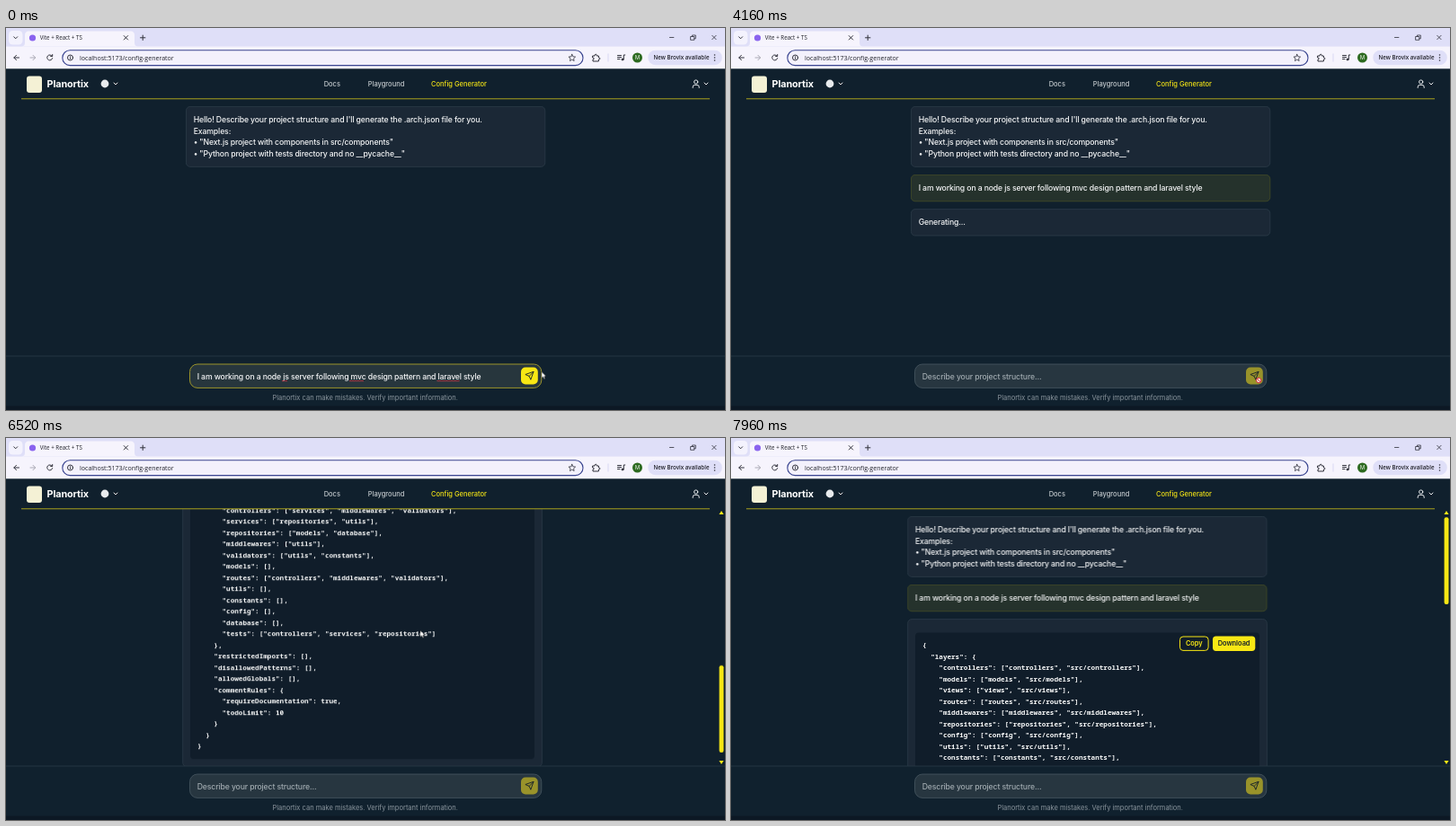
These frames come from a looping animation (800 px wide and 425 px high, 8 s). An HTML page:

```html
<!DOCTYPE html>
<html lang="en">
<head>
<meta charset="utf-8">
<title>Config Generator</title>
<style>
  html, body { margin: 0; width: 100%; height: 100%; overflow: hidden; background: #10202d; }
  svg { display: block; width: 100vw; height: 100vh; }
  text { font: 8.7px Inter, sans-serif; fill: #f6f7f8; white-space: pre; }
  .browser text { font: 6.2px "Open Sans", sans-serif; fill: #22232b; }
  .browser .url { font-size: 7.05px; }
  .browser .update { font-size: 6.2px; font-weight: 600; }
  .nav .brand { font-size: 10.8px; font-weight: 700; letter-spacing: -.1px; fill: #fff; text-anchor: start; }
  .nav text { font-size: 7.5px; font-weight: 500; fill: #c3c9cd; text-anchor: middle; }
  .nav .active { fill: #f3e316; }
  .chat text, .composer text { font-weight: 500; letter-spacing: -.14px; }
  .chat .code text { font: 600 7.64px "Noto Sans Mono", monospace; letter-spacing: 0; fill: #fafbfb; }
  .chat .label { font-size: 7.4px; font-weight: 600; letter-spacing: 0; text-anchor: middle; }
  .composer .note { font-size: 7.5px; font-weight: 400; letter-spacing: 0; fill: #8b969e; text-anchor: middle; }
  .composer .hint { fill: #a0aaaf; }
  .line { fill: none; stroke-linecap: round; stroke-linejoin: round; }
  .card { fill: #1b2836; stroke: #303f4c; stroke-width: .7; }

  .draft, .sent, .pending, .answer, .shift, .arrow, .pointer, .blocked {
    animation: 8s step-end infinite;
  }
  .draft { animation-name: draft; }
  .sent { animation-name: sent; }
  .pending { animation-name: pending; }
  .answer { animation-name: answer; }
  .shift { animation-name: shift; }
  .blocked { animation-name: blocked; }
  .arrow { animation-name: arrow; }
  .pointer { animation-name: pointer; animation-timing-function: ease-in-out; }
  .scroll { animation: scroll 8s linear infinite; }

  @keyframes draft { 0% { opacity: 1 } 5.5%, 100% { opacity: 0 } }
  @keyframes sent { 0% { opacity: 0 } 5.5%, 100% { opacity: 1 } }
  @keyframes pending { 0% { opacity: 0 } 5.5% { opacity: 1 } 58%, 100% { opacity: 0 } }
  @keyframes answer { 0% { opacity: 0 } 58%, 100% { opacity: 1 } }
  @keyframes shift { 0% { transform: none } 58%, 100% { transform: translateX(-3.7px) } }
  @keyframes blocked { 0% { opacity: 0 } 5.5% { opacity: 1 } 71%, 100% { opacity: 0 } }
  @keyframes arrow { 0% { opacity: 1 } 5.5% { opacity: 0 } 71% { opacity: 1 } 95.5%, 100% { opacity: 0 } }
  @keyframes pointer {
    0%, 1.5% { transform: translate(596px, 382.5px) }
    5%, 71% { transform: translate(583px, 387px) }
    78%, 100% { transform: translate(461px, 214.3px) }
  }
  @keyframes scroll {
    0% { transform: none }
    58.23% { transform: none; animation-timing-function: ease-in-out }
    67%, 81% { transform: translateY(var(--travel)) }
    95.25%, 100% { transform: none }
  }
</style>
</head>
<body>
<svg viewBox="0 0 800 425" preserveAspectRatio="none">
  <defs>
    <clipPath id="view"><rect y="79" width="800" height="286"/></clipPath>
    <path id="chevron" class="line" d="M-2-1 0 1 2-1" stroke-width="1"/>
    <path id="send" class="line" transform="translate(577.4 381.8) scale(.43)" stroke="#16212b"
      stroke-width="2.1" d="M22 2 11 13M22 2l-7 20-4-9-9-4z"/>
  </defs>

  <rect width="800" height="425" fill="#10202d"/>

  <g class="chat" clip-path="url(#view)">
    <g class="scroll" style="--travel:-506px">
      <g class="shift">
        <rect class="card" x="200.4" y="87.4" width="399.4" height="67" rx="4.5"/>
        <text x="208.7" y="105.2">Hello! Describe your project structure and I'll generate the .arch.json file for you.</text>
        <text x="208.7" y="117.7">Examples:</text>
        <text x="208.7" y="130.2">• "Next.js project with components in src/components"</text>
        <text x="208.7" y="142.7">• "Python project with tests directory and no __pycache__"</text>
        <g class="sent">
          <rect x="200.4" y="163.4" width="399.4" height="29.4" rx="4.5" fill="#25322c" stroke="#4d5328" stroke-width=".7"/>
          <text x="208.7" y="181.2">I am working on a node js server following mvc design pattern and laravel style</text>
        </g>
        <g class="pending">
          <rect class="card" x="200.4" y="201.6" width="399.4" height="29.4" rx="4.5"/>
          <text x="208.7" y="219.4">Generating...</text>
        </g>
      </g>
      <g class="answer">
        <rect class="card" x="196.7" y="201.6" width="399.6" height="652" rx="4.5"/>
        <rect x="205" y="216.5" width="383" height="628.5" rx="4" fill="#101d2a"/>
        <g class="code" id="code"></g>
        <rect x="499.5" y="221" width="31.6" height="15.4" rx="3.5" fill="#101d2a" stroke="#f8e714"/>
        <text class="label" x="515.3" y="231.4" style="fill:#f8e714">Copy</text>
        <rect x="536" y="220.5" width="47.3" height="16.4" rx="3.7" fill="#f8e714"/>
        <text class="label" x="559.6" y="231.4" style="fill:#15202a">Download</text>
      </g>
    </g>
  </g>

  <g class="answer" fill="#f8e714">
    <path d="m796 81 2.6 4h-5.2zM796 363l2.6-4h-5.2z"/>
    <rect class="scroll" style="--travel:171px" x="793.6" y="88.3" width="4.9" height="96.6" rx="2"/>
  </g>

  <g class="nav">
    <rect x="17" y="78.2" width="766" height="1.1" fill="#9b9420"/>
    <rect x="23" y="53.5" width="17" height="18.5" rx="3" fill="#f4f1d5"/>
    <text class="brand" x="45.5" y="66">Planortix</text>
    <circle cx="110" cy="62" r="4.4" fill="#e8ebed"/>
    <use href="#chevron" x="122" y="62" stroke="#e8ebed"/>
    <text x="362.8" y="64.8">Docs</text>
    <text x="423" y="64.8">Playground</text>
    <text class="active" x="504" y="64.8">Config Generator</text>
    <g class="line" stroke="#e8ebed" stroke-width="1">
      <circle cx="767.7" cy="60" r="2.1"/>
      <path d="M764.2 66.5v-.8a2.3 2.3 0 0 1 2.3-2.3h2.4a2.3 2.3 0 0 1 2.3 2.3v.8"/>
      <use href="#chevron" x="779" y="62"/>
    </g>
  </g>

  <g class="composer">
    <rect y="365" width="800" height="60" fill="#10212e"/>
    <rect y="364.6" width="800" height=".8" fill="#293a47"/>
    <rect y="420.5" width="800" height="4.5" fill="#0c1824"/>
    <g class="draft">
      <rect x="204.5" y="374" width="391.3" height="26.4" rx="8.5" fill="#27363d" stroke="#9b942b"/>
      <text x="212.7" y="390.6">I am working on a node js server following mvc design pattern and laravel style</text>
      <path d="M307 392.7h6M382 392.7h16M479.5 392.7h25" stroke="#cf3645" stroke-width=".8"/>
      <rect x="573" y="377.6" width="18.8" height="18.8" rx="5" fill="#f8e714"/>
    </g>
    <g class="sent">
      <rect x="204.5" y="374" width="391.3" height="26.4" rx="8.5" fill="#273640" stroke="#4a5962" stroke-width=".8"/>
      <text class="hint" x="212.7" y="390.6">Describe your project structure...</text>
      <rect x="573" y="377.6" width="18.8" height="18.8" rx="5" fill="#99932a"/>
    </g>
    <use href="#send"/>
    <text class="note" x="399.7" y="414.3">Planortix can make mistakes. Verify important information.</text>
  </g>

  <g class="browser">
    <rect width="800" height="45.3" fill="#f6f4fd"/>
    <rect width="800" height="20.6" fill="#dfdff8"/>
    <rect x="3" y="3" width="15.5" height="15.5" rx="4.5" fill="#f3f2fd"/>
    <path d="M17 20.6q4 0 4-4V8q0-4.5 4.5-4.5h113q4.500 0 4.500 4.500v8.600q0 4 4 4z" fill="#f6f4fd"/>
    <circle cx="29.5" cy="11" r="3.6" fill="#8a63ee"/>
    <text x="37.7" y="13.1">Vite + React + TS</text>
    <rect x="62.8" y="24.8" width="579.2" height="16.8" rx="8.4" fill="#f3f1fc" stroke="#38438f" stroke-width="1.1"/>
    <text class="url" x="82" y="35.7">localhost:5173/config-generator</text>
    <g class="line" stroke="#30313b" stroke-width="1">
      <use href="#chevron" x="10.7" y="10.8"/>
      <path d="m131.2 8.6 4.4 4.4m0-4.400-4.400 4.400M149.500 10.800h5.400m-2.700-2.700v5.400"/>
      <path d="M738.5 10.500h4.400M762 9.500h3.800v3.800H762zM763.500 9.500V8h3.800v3.800h-1.500M785.700 8.300l4.400 4.400m0-4.400-4.400 4.400" stroke-width=".8"/>
      <path d="M14.5 33H9m2.500-2.700L8.800 33l2.700 2.700"/>
      <path d="M27 33h5.500m-2.500-2.700 2.700 2.700-2.700 2.700" stroke="#aaa9b5"/>
      <path d="M51.3 31.300a3 3 0 1 0 .4 2.300M51.700 29.500v2h-2"/>
      <circle cx="71.5" cy="33" r="3"/>
      <path d="M71.5 32.800v1.500m0-3v.05"/>
      <path d="m629.8 29.300 1.100 2.500 2.700.3-2 1.800.5 2.700-2.300-1.400-2.300 1.400.5-2.700-2-1.800 2.700-.3z" stroke-width=".8"/>
      <path d="M653 31h2q0-1.800 1.200-1.800t1.200 1.800h2v2q1.600 0 1.600 1t-1.600 1v2H653v-2q1.300 0 1.300-1t-1.300-1z"/>
      <path d="M680.5 30.500h4m-4 2h4m-4 2h2.500m4.300 0v-4.500h1.500"/>
      <circle cx="686" cy="35" r="1" fill="#30313b"/>
    </g>
    <rect x="669.6" y="28.5" width=".8" height="9" fill="#d2d1ef"/>
    <circle cx="702.5" cy="33" r="5.5" fill="#2d6a20"/>
    <text x="702.5" y="35.1" text-anchor="middle" style="fill:#fff">M</text>
    <rect x="714.3" y="24.7" width="82.5" height="16.5" rx="8.25" fill="#dfdff8"/>
    <text class="update" x="720.5" y="35.2">New Brovix available</text>
    <path d="M788.5 30v.01M788.500 33v.01M788.500 36v.01" class="line" stroke="#30313b" stroke-width="1.6"/>
  </g>

  <g class="blocked" stroke="#d62b3c" stroke-width="1">
    <circle cx="587.2" cy="392" r="2.7" fill="#f3e4dc"/>
    <path d="m585.3 390.1 3.8 3.8"/>
  </g>
  <g class="arrow">
    <path class="pointer" d="M0 0v7l1.700-1.500 1.100 2.500 1.100-.5L2.800 5H5z" fill="#fff" stroke="#1a1a1a" stroke-width=".4"/>
  </g>
</svg>

<script>
  const layerNames = "controllers models views routes middlewares repositories config utils constants database".split(" ");
  const config = {
    layers: {
      ...Object.fromEntries(layerNames.map(name => [name, [name, "src/" + name]])),
      tests: ["tests/unit", "tests/integration"],
      docs: ["docs"]
    },
    codeRules: {
      namingConventions: { function: "camelCase", variable: "camelCase", class: "PascalCase", file: "kebab-case" },
      functionStyle: { enforce: "any", allowed: ["arrow", "functionDeclaration"] },
      layerDependencies: {
        controllers: ["services", "middlewares", "validators"],
        services: ["repositories", "utils"],
        repositories: ["models", "database"],
        middlewares: ["utils"],
        validators: ["utils", "constants"],
        models: [],
        routes: ["controllers", "middlewares", "validators"],
        utils: [], constants: [], config: [], database: [],
        tests: ["controllers", "services", "repositories"]
      },
      restrictedImports: [],
      disallowedPatterns: [],
      allowedGlobals: [],
      commentRules: { requireDocumentation: true, todoLimit: 10 }
    }
  };

  // Pretty-prints objects over several lines but keeps arrays on one.
  function format(value, pad = "") {
    if (Array.isArray(value)) return `[${value.map(item => JSON.stringify(item)).join(", ")}]`;
    if (typeof value !== "object") return JSON.stringify(value);
    const inner = pad + "  ";
    const rows = Object.entries(value).map(([key, item]) => `${inner}"${key}": ${format(item, inner)}`);
    return `{\n${rows.join(",\n")}\n${pad}}`;
  }

  const code = document.getElementById("code");
  format(config).split("\n").forEach((row, i) => {
    const line = document.createElementNS(code.namespaceURI, "text");
    const content = row.trimStart();
    line.setAttribute("x", 213 + (row.length - content.length) * 4.584);
    line.setAttribute("y", 233 + i * 12.5);
    line.textContent = content;
    code.append(line);
  });
</script>
</body>
</html>
```
